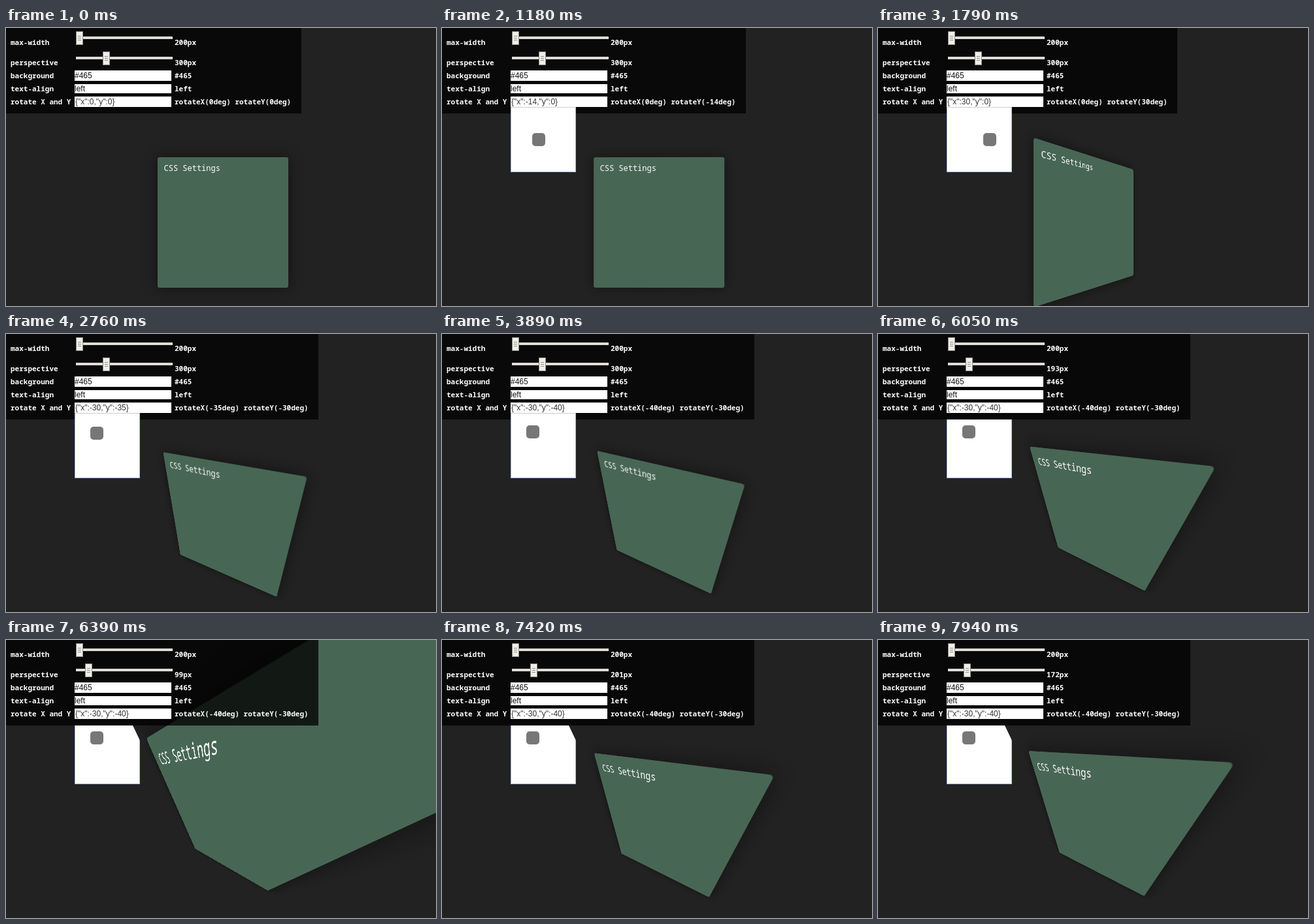
Recreate the animation shown at these times as an HTML page. Size 658 px wide and 426 px high, loop 8 s.

```html
<!DOCTYPE html>
<html lang="en">
<head>
<meta charset="utf-8">
<title>CSS Settings</title>
<style>
html, body { margin: 0; width: 100%; height: 100%; overflow: hidden; background: #222; }
body { position: relative; }
#box {
  position: absolute; left: 232px; top: 198px; width: 200px; height: 200px;
  box-sizing: border-box; padding: 7px 9.5px 0; border-radius: 3px;
  background: #486654; box-shadow: 0 0 20px rgba(0, 0, 0, .5); color: #fff;
  font: 500 12px/20px "Noto Sans Mono", monospace; white-space: pre;
}
#panel { position: absolute; left: 0; top: 0; z-index: 1; }
#panel text { white-space: pre; }
.label { font: bold 11px "Noto Sans Mono", monospace; fill: #fff; }
.field { font: 12px "Liberation Sans", Arial, sans-serif; fill: #111; }
#pad {
  position: absolute; left: 105px; top: 121px; width: 100px; height: 100px; z-index: 2;
  box-sizing: border-box; background: #fff; border: 1px solid #9db4ee; border-top-color: #ccc;
}
#knob { position: absolute; width: 20px; height: 20px; border-radius: 5px; background: #777; }
</style>
</head>
<body>
<div id="box">CSS Settings</div>
<svg id="panel" width="658" height="131"></svg>
<div id="pad"><div id="knob"></div></div>
<script>
const LOOP = 8000, LAG = 90, CHAR = 6.6;
const $ = id => document.getElementById(id);
const panel = $('panel'), box = $('box'), pad = $('pad'), knob = $('knob');

function add(tag, attrs, content = '') {
  const el = document.createElementNS('http://www.w3.org/2000/svg', tag);
  for (const name in attrs) el.setAttribute(name, attrs[name]);
  el.textContent = content;
  panel.append(el);
  return el;
}
const rect = (x, y, width, height, fill) => add('rect', { x, y, width, height, fill });
const text = (x, y, cls, content) => add('text', { x, y, class: cls }, content);

// A labelled row; returns the text that shows its value.
function row(y, name, value) {
  text(7, y, 'label', name);
  return text(258, y, 'label', value);
}

function slider(y) {
  rect(107, y + 8, 148, 4, '#dfddd6');
  const parts = [
    rect(0, y, 11, 21, '#8d8b86'),
    rect(1, y + 1, 9, 19, '#f0eee9'),
    ...[7, 10, 13].map(dy => rect(3, y + dy, 5, 1, '#8f8d88'))
  ];
  return x => parts.forEach(p => p.setAttribute('transform', `translate(${x} 0)`));
}

function input(x, top, height, baseline, value) {
  rect(105, top, 148, height, '#fff');
  return text(x, baseline, 'field', value);
}

const back = rect(0, 0, 452, 131, 'rgba(0,0,0,.75)');
const ring = rect(104, 104, 150, 18, '#4d7fe0');
slider(5)(107);
const moveThumb = slider(36);
input(105, 65, 16, 77, '#465');
input(105, 86, 14, 97, 'left');
const angleField = input(106, 105, 16, 117, '');
angleField.style.fill = '#333';
row(26, 'max-width', '200px');
const depthLabel = row(57, 'perspective', '');
row(77, 'background', '#465');
row(97, 'text-align', 'left');
const angleLabel = row(117, 'rotate X and Y', '');

function ease(u) {
  u = Math.min(1, Math.max(0, u));
  return u * u * (3 - 2 * u);
}

// Each move is [start, end, value reached].
const glide = (from, ...moves) => t =>
  moves.reduce((v, [start, end, to]) => v + (to - v) * ease((t - start) / (end - start)), from);

const turnAt = glide(0, [1080, 1290, -30], [1290, 1516, 58], [1516, 2266, -35], [2300, 2560, -30]);
const tiltAt = glide(0, [2440, 2670, -35], [3080, 3190, -38], [3580, 3800, -40]);
const depthAt = glide(300, [4790, 5430, 602], [5600, 6240, 84], [6389, 6390, 99],
  [6430, 6910, 290], [7080, 7734, 122], [7734, 7940, 172]);

function draw(t) {
  const x = Math.round(turnAt(t)), y = Math.round(tiltAt(t));
  const depth = Math.round(depthAt(t));
  const angles = `rotateX(${y}deg) rotateY(${x}deg)`;

  angleField.textContent = `{"x":${x},"y":${y}}`;
  angleLabel.textContent = angles;
  depthLabel.textContent = depth + 'px';
  back.setAttribute('width', Math.floor(274 + angles.length * CHAR));
  moveThumb(Math.round(107.4 + depth * .136));
  ring.style.display = t >= 100 && t < 250 ? '' : 'none';

  pad.style.display = t < 250 ? 'none' : '';
  pad.style.clipPath = t < 4820 ? 'none'
    : t < 6150 ? 'inset(10px 0 0 0)'
    : 'polygon(0 10px, 89px 10px, 100px 33px, 100px 100px, 0 100px)';
  knob.style.left = 39 + Math.round(x * .533) + 'px';
  knob.style.top = 39 + Math.round(y * .533) + 'px';

  // The box trails its settings slightly.
  box.style.transform =
    `perspective(${depth}px) rotateX(${tiltAt(t - LAG)}deg) rotateY(${turnAt(t - LAG)}deg)`;
}

const start = performance.now();
function tick() {
  draw((performance.now() - start) % LOOP);
  requestAnimationFrame(tick);
}
tick();
</script>
</body>
</html>
```
